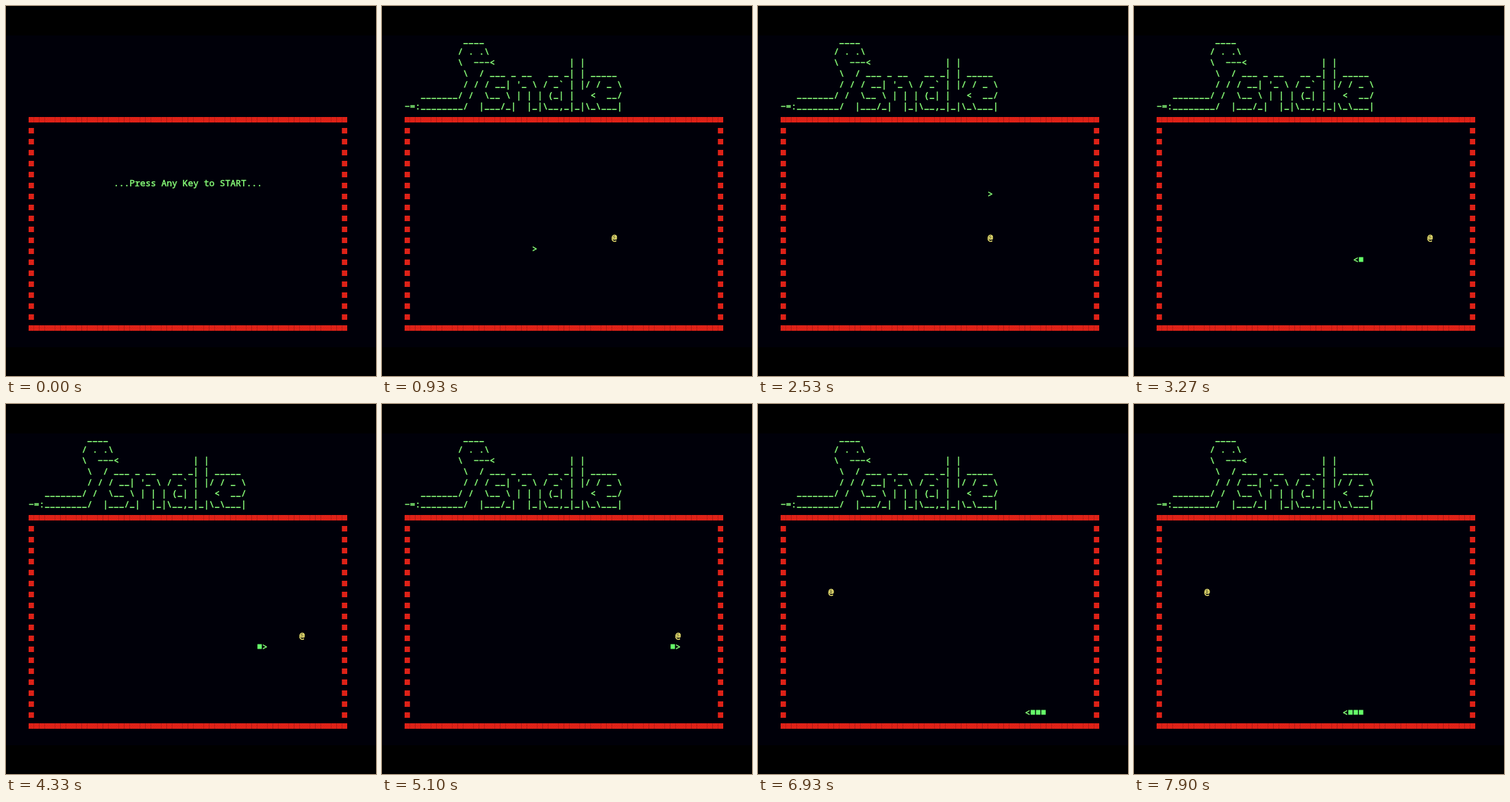
Recreate the animation shown at these times as an HTML page with a canvas. Size 540 px wide and 540 px high, loop 8 s.

```html
<!DOCTYPE html>
<html lang="en">
<head>
<meta charset="utf-8">
<title>Snake</title>
<style>
  html, body { margin: 0; width: 100%; height: 100%; overflow: hidden; background: #000; }
  canvas { display: block; }
</style>
</head>
<body>
<canvas id="stage" width="540" height="540"></canvas>
<script>
const ctx = document.getElementById("stage").getContext("2d");
const LOOP = 8000, COLS = 60, ROWS = 19;
const CELL_W = 7.75, CELL_H = 16, LEFT = 33, TOP = 162;
const GREEN = "#86fb78", BODY = "#66ff6a", YELLOW = "#fff67a", RED = "#e62418", DARK_RED = "#bd1a16";
const SCREEN = "#000009";

const TITLE = [
  "           ____",
  "          / . .\\",
  "          \\  −−−<              | |",
  "           \\  / ___ _ __   __ _| | _____",
  "           / / / __| '_ \\ / _` | |/ / _ \\",
  "   _______/ /  \\__ \\ | | | (_| |   <  __/",
  "−=:________/  |___/_|  |_|\\__,_|_|\\_\\___|",
];
const PROMPT = "...Press Any Key to START...";
const GAME_START = 800;

// Direction: [dx, dy, head glyph]
const DIRS = { R: [1, 0, ">"], L: [-1, 0, "<"], U: [0, -1, "^"], D: [0, 1, "v"] };
// Runs of steps: [start ms, ms per step, path]
const RUNS = [
  [800, 79, "R16"],
  [2200, 66, "U5R1"],
  [2670, 83, "D6L4"],
  [3530, 100, "U1R1"],
  [3770, 79, "R8"],
  [4430, 100, "R4"],
  [4870, 30, "R2"],
  [5070, 78, "R1U5L2D1"],
  [5870, 86, "D6"],
  [6470, 76, "D4L3"],
  [7030, 78, "L7"],
  [7670, 76, "L4"],
];
const APPLES = [[39, 11], [51, 11], [47, 18], [9, 7]];

// Every head position with its time and the apples eaten so far
const trail = [];
let x = 22, y = 12, eaten = 0;
for (const [start, step, path] of RUNS) {
  let time = start;
  for (const [, key, count] of path.matchAll(/([RLUD])(\d+)/g)) {
    const [dx, dy, glyph] = DIRS[key];
    for (let i = 0; i < +count; i++, time += step) {
      x += dx;
      y += dy;
      if (x === APPLES[eaten][0] && y === APPLES[eaten][1]) eaten++;
      trail.push({ time, x, y, glyph, eaten });
    }
  }
}

function text(str, col, row, color) {
  ctx.fillStyle = ctx.strokeStyle = color;
  [...str].forEach((ch, i) => {
    const cx = LEFT + (col + i + 0.5) * CELL_W, cy = TOP + row * CELL_H;
    if (ch === "_") return ctx.fillRect(cx - 3.3, cy + 4, 6.6, 1.6); // short, high underscore
    ctx.fillText(ch, cx, cy + 5);
    ctx.strokeText(ch, cx, cy + 5);
  });
}

function brick(col, row) {
  const left = LEFT + col * CELL_W, top = TOP + row * CELL_H;
  ctx.fillStyle = RED;
  ctx.fillRect(left, top, CELL_W, 8);
  ctx.fillStyle = DARK_RED;
  for (let i = 0; i < 3; i++)
    for (let j = 0; j < 4; j++)
      ctx.fillRect(left + (i + (j % 2) / 2) * CELL_W / 3, top + j * 2 + 0.5, 1, 1);
}

function drawWalls() {
  for (let col = 0; col < COLS; col++) {
    brick(col, 0);
    brick(col, ROWS);
  }
  for (let row = 1; row < ROWS; row++) {
    brick(0, row);
    brick(COLS - 1, row);
  }
}

function drawGame(t) {
  TITLE.forEach((line, i) => text(line, 0, i - TITLE.length, GREEN));
  const path = trail.filter(p => p.time <= t);
  const head = path.at(-1);
  text("@", ...APPLES[head.eaten], YELLOW);
  ctx.fillStyle = BODY;
  for (const p of path.slice(-1 - head.eaten, -1))
    ctx.fillRect(LEFT + p.x * CELL_W + 0.7, TOP + p.y * CELL_H - 3.5, 6.4, 7);
  text(head.glyph, head.x, head.y, GREEN);
}

function frame(now) {
  const t = now % LOOP;
  ctx.fillStyle = "#000";
  ctx.fillRect(0, 0, 540, 540);
  ctx.fillStyle = SCREEN;
  ctx.fillRect(0, 43, 540, 455);
  ctx.font = '12.9px "Noto Sans Mono", "DejaVu Sans Mono", monospace';
  ctx.textAlign = "center";
  ctx.lineWidth = 0.5;
  drawWalls();
  if (t < GAME_START) text(PROMPT, 16, 6, GREEN);
  else drawGame(t);
  requestAnimationFrame(frame);
}
requestAnimationFrame(frame);
</script>
</body>
</html>
```
